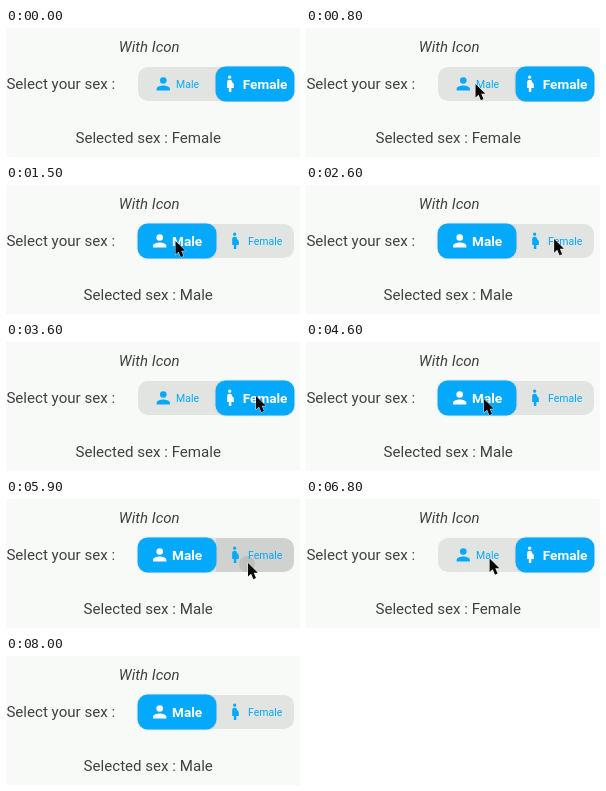
Animation of 294 by 129 pixels, one loop 8.5 s. Source, as an HTML page with a canvas:

```html
<!DOCTYPE html>
<html lang="en">
<head>
<meta charset="utf-8">
<title>Icon toggle</title>
<style>
html, body { margin: 0; width: 100%; height: 100%; overflow: hidden; background: #f8faf7; }
canvas { display: block; width: 294px; height: 129px; }
</style>
</head>
<body>
<canvas id="stage"></canvas>
<script>
const W = 294, H = 129, LOOP = 8500, STEP = 100;
const BACK = '#f8faf7', BLUE = '#05a9fc', INK = '#404140', TRACK = '#e1e4e0';
const PILL = { x: 132, y: 39, w: 78, h: 34, r: 10 };
const canvas = document.getElementById('stage');
const ctx = canvas.getContext('2d');
const ratio = window.devicePixelRatio || 1;
canvas.width = W * ratio;
canvas.height = H * ratio;

const PERSON = new Path2D('M12 12a4 4 0 1 0 0-8 4 4 0 0 0 0 8zm0 2c-2.67 0-8 1.34-8 4v2h16v-2c0-2.66-5.33-4-8-4z');
const WOMAN = new Path2D('M9 4a2 2 0 1 1 4 0 2 2 0 0 1-4 0zm7 9c0-1.34-.83-2.51-2-3a3 3 0 0 0-6 0v7h2v5h3v-5h3z');
const ARROW = new Path2D('M0 0V13.6L3.1 10.8 5.4 16.2 8 15.1 5.7 9.8H9.8z');

const options = [
  { label: 'Male', icon: PERSON, on: { icon: 153.7, text: 166 }, off: { icon: 157.3, text: 170 } },
  { label: 'Female', icon: WOMAN, on: { icon: 224.5, text: 236.8 }, off: { icon: 229.5, text: 242 } }
];

// Each tap switches the choice after the button was held for a while.
const taps = [
  { at: 1500, hold: 100 }, { at: 2900, hold: 0 }, { at: 4600, hold: 200 },
  { at: 6000, hold: 200 }, { at: 7400, hold: 100 }
];

const SHOW = 100, HIDE = 8000, ENTRY = { x: 140, y: 107 };
const glides = [
  { from: 100, to: 400, x: 216, y: 74 },
  { from: 500, to: 800, x: 169.5, y: 56 },
  { from: 1900, to: 2800, x: 250, y: 54 },
  { from: 3600, to: 4200, x: 178, y: 57 },
  { from: 4900, to: 5400, x: 242, y: 64 },
  { from: 6500, to: 7000, x: 177, y: 59 },
  { from: 7800, to: 8000, x: 130, y: 76 }
];

const easeOut = k => 1 - Math.pow(1 - k, 2.5);

function pointerAt(t) {
  let { x, y } = ENTRY;
  for (const g of glides) {
    if (t < g.from) break;
    const k = easeOut(Math.min(1, (t - g.from) / (g.to - g.from)));
    x += (g.x - x) * k;
    y += (g.y - y) * k;
  }
  return { x, y };
}

function text(str, x, y, font, color, align = 'left') {
  ctx.font = font + ' Roboto, sans-serif';
  ctx.fillStyle = color;
  ctx.textAlign = align;
  ctx.fillText(str, x, y);
}

function box(x, y, w, h, r, color) {
  ctx.beginPath();
  ctx.roundRect(x, y, w, h, r);
  ctx.fillStyle = color;
  ctx.fill();
}

function drawOption(index, on) {
  const opt = options[index];
  const place = on ? opt.on : opt.off;
  const color = on ? '#fff' : BLUE;
  if (on) {
    ctx.save();
    ctx.shadowColor = 'rgba(0,0,0,.18)';
    ctx.shadowBlur = 2 * ratio;
    box(PILL.x + index * PILL.w - 0.4, PILL.y - 0.4, PILL.w + 0.8, PILL.h + 0.8, PILL.r, BLUE);
    ctx.restore();
  }
  ctx.save();
  ctx.translate(place.icon, 55.8);
  ctx.scale(0.83, 0.83);
  ctx.translate(-12, -12);
  ctx.fillStyle = color;
  ctx.fill(opt.icon);
  ctx.restore();
  text(opt.label, place.text, on ? 61 : 59.8, on ? 'bold 13.6px' : '10.5px', color);
}

function drawPress(index, age, tip) {
  const { x, y, w, h, r } = PILL;
  const corners = index ? [0, r, r, 0] : [r, 0, 0, r];
  const grow = Math.min(1, (age + STEP) / (2 * STEP));
  box(x + index * w, y, w, h, corners, `rgba(0,0,0,${0.08 * grow})`);
  ctx.beginPath();
  ctx.arc(tip.x - 1, tip.y + 1, 8 * grow, 0, Math.PI * 2);
  ctx.fillStyle = 'rgba(0,0,0,.08)';
  ctx.fill();
}

function drawPointer({ x, y }) {
  ctx.save();
  ctx.translate(x, y);
  ctx.lineWidth = 1;
  ctx.lineJoin = 'round';
  ctx.strokeStyle = 'rgba(255,255,255,.8)';
  ctx.stroke(ARROW);
  ctx.fillStyle = '#080808';
  ctx.fill(ARROW);
  ctx.restore();
}

function draw(t) {
  const done = taps.filter(tap => tap.at <= t).length;
  const selected = (done + 1) % 2, other = 1 - selected;
  const next = taps[done];
  const tip = pointerAt(t);

  ctx.setTransform(ratio, 0, 0, ratio, 0, 0);
  ctx.fillStyle = BACK;
  ctx.fillRect(0, 0, W, H);
  text('With Icon', 143.2, 24, 'italic 15px', INK, 'center');
  text('Select your sex :', 0.4, 61, '15.1px', INK);
  text('Selected sex : ' + options[selected].label, 142.2, 115, '15.1px', INK, 'center');

  box(PILL.x, PILL.y, PILL.w * 2, PILL.h, PILL.r, TRACK);
  if (next && t >= next.at - next.hold) drawPress(other, t - next.at + next.hold, tip);
  drawOption(other, false);
  drawOption(selected, true);
  if (t >= SHOW && t < HIDE) drawPointer(tip);
}

const start = performance.now();
function tick() {
  const t = (performance.now() - start) % LOOP;
  draw(Math.floor(t / STEP) * STEP);
  requestAnimationFrame(tick);
}
tick();
</script>
</body>
</html>
```
